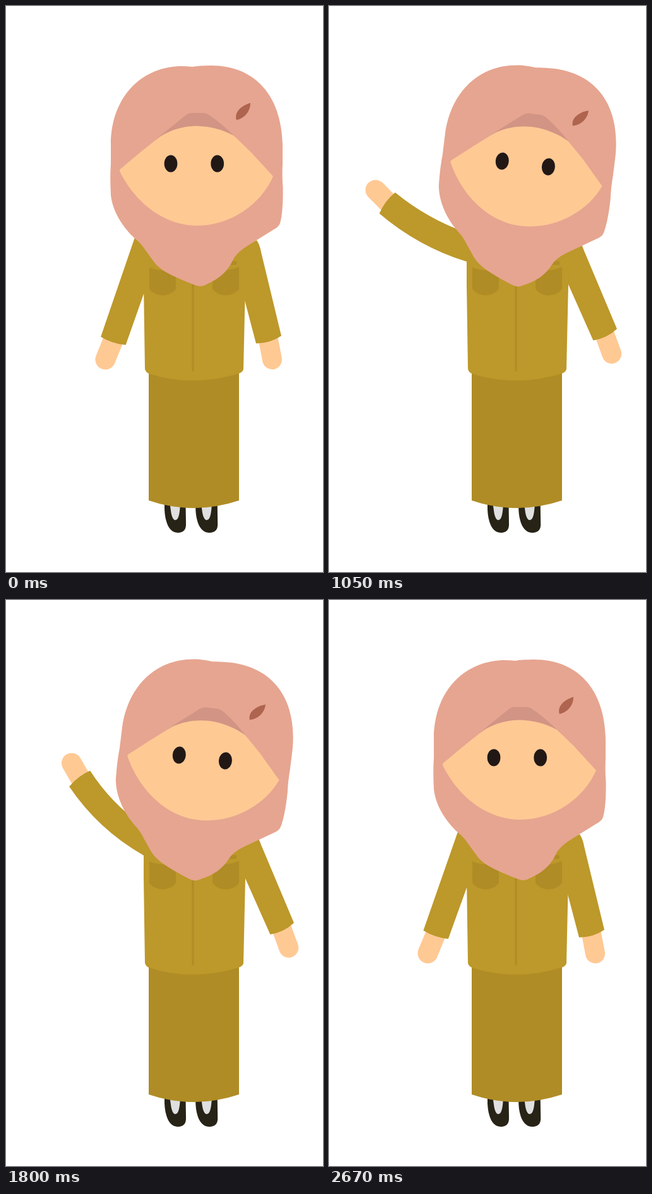
These frames come from a looping animation (502x894 px, 2.7 s). An HTML page:

```html
<!DOCTYPE html>
<html lang="en">
<head>
<meta charset="utf-8">
<title>Waving figure</title>
<style>
html, body { margin: 0; width: 100%; height: 100%; overflow: hidden; background: #fff; }
svg { display: block; width: 100%; height: 100%; }
.shirt { fill: #bd982a; }
.dark { fill: #af8c25; }
.skin { fill: #ffc994; }
.hand { fill: none; stroke: #ffc994; stroke-linecap: round; }
.scarf { fill: #e6a590; }
.eye { fill: #211816; }
</style>
</head>
<body>
<svg viewBox="0 0 502 894">
  <defs>
    <g id="shoe">
      <path fill="#272316" d="M251 786V795C252 817 259 832 272 832C281 832 285 827 285 819L284.500 786Z"/>
      <path fill="#e0e0e0" d="M259.500 786L261 797C262 806 265 812 268 812C273 812 275 804 276 786Z"/>
    </g>
  </defs>
  <use href="#shoe"/>
  <use href="#shoe" transform="translate(41.700) scale(1.030 1)"/>
  <path class="dark" d="M226 570V781Q297 805 369 781V570Z"/>

  <path id="waveHand" class="hand" stroke-width="32"/>
  <path id="waveArm" class="shirt"/>

  <g id="restArm">
    <path class="hand" stroke-width="31" d="M414.500 522L421.500 558.500"/>
    <path class="shirt" d="M372 380L397 370Q402 377 404.500 391L436 521Q418 533 396 533L371.500 440Z"/>
  </g>

  <path class="shirt" d="M218 368H380L379 440L376 573Q376 577 370 580Q297 603 227 581Q220.500 578 220 573L218 440Z"/>
  <path class="dark" d="M227 413Q240 419 269 418V447Q261 457 247 457Q234 456 227 447Z"/>
  <path class="dark" d="M369 412Q356 419 327 418V447Q335 457 349 457Q362 456 369 447Z"/>
  <path class="dark" d="M345 403H364Q367 406 364 409H345Z"/>
  <path class="dark" d="M294.500 430H297.500V577H294.500Z"/>

  <g id="head">
    <path class="scarf" d="M295 96C287 95 281 95 274 95C205 99 166 153 166 219L166 250Q164.500 268 166 299C169 325 185 350 205 368Q214 375 221 386L235 405C246 419 264 427 300 441Q309 445 317 440C340 430 352 417 359 402Q364 391 379 381L395 371L424 353Q432 349 434 343Q439 325 438.500 287Q437 270 438 250V218C436 143 396 94 324 94Q306 94 295 96Z"/>
    <path fill="#d29484" d="M238 210L284 173Q289 169 294 169H311Q318 169 323 173Q346 189 366 210L302 225Z"/>
    <path class="skin" d="M180.500 258L214 230L243 207C263 194 283 190 302 189.500C323 190 343 195 361 205L388 231L423 269C404 313 356 347 302 347C253 347 206 313 180.500 262Q179.500 260 180.500 258Z"/>
    <path fill="#ae644f" d="M387 153C371 158 361 169 365 180C376 178 387 168 387 153Z"/>
    <ellipse class="eye" cx="261" cy="249"/>
    <ellipse class="eye" cx="334.700" cy="249"/>
  </g>
</svg>
<script>
const LOOP = 2700;
const RISE = 748, BACK = 1930, BACK_END = 2695;   // lean in, lean back
const REST = 18, HIGH = 142, LOW = 101.5;         // wave arm angles, degrees from straight down
const SHOULDER = [215, 390];
const $ = id => document.getElementById(id);
const eyes = document.querySelectorAll('.eye');

const mix = (a, b, k) => a + (b - a) * k;
const ease = (t, from, to) => {
  const k = Math.min(1, Math.max(0, (t - from) / (to - from)));
  return (1 - Math.cos(Math.PI * k)) / 2;
};
const rad = deg => deg * Math.PI / 180;
const step = ([x, y], deg, len) => [x - Math.sin(rad(deg)) * len, y + Math.cos(rad(deg)) * len];
const fmt = p => p.map(v => v.toFixed(2)).join(' ');

// control point that bends the edge a-b towards the lower side
function bend([ax, ay], [bx, by], deg) {
  const k = Math.tan(rad(deg)) / 2;
  return [(ax + bx) / 2 + (by - ay) * k, (ay + by) / 2 - (bx - ax) * k];
}

function drawWave(angle) {
  const turn = angle - REST, curve = turn * 0.11, fade = Math.exp(-turn / 25);
  const cuff = step(SHOULDER, angle, 146);
  const side = angle + turn * 0.04 + 90;
  const outer = step(cuff, side, 20.8), inner = step(cuff, side, -20.8);
  const top = [217 - 13.5 * fade, 367 - 0.09 * turn], pit = [218, 403 + 52 * fade];
  const hem = step(cuff, angle + turn * 0.04, 5);
  $('waveArm').setAttribute('d',
    `M${fmt(top)}Q${fmt(bend(top, outer, curve * 0.85))} ${fmt(outer)}` +
    `Q${fmt(hem)} ${fmt(inner)}Q${fmt(bend(pit, inner, curve))} ${fmt(pit)}L240 420L240 365Z`);

  const wrist = Math.min(1, turn / 75);
  const tip = step(cuff, angle + 5 + 10 * wrist, 32 - 4.5 * wrist);
  $('waveHand').setAttribute('d', `M${fmt(step(cuff, angle, -6))}L${fmt(tip)}`);
}

function draw(t) {
  const lean = ease(t, 0, RISE) - ease(t, BACK, BACK_END);
  const dip = ease(t, 775, 1345) - ease(t, 1435, 1900);
  const shut = ease(t, 0, 120) - ease(t, 630, 750) + ease(t, BACK, 2050) - ease(t, 2540, 2660);

  $('head').setAttribute('transform', `rotate(${7 * lean} 300.4 355.5)`);
  $('restArm').setAttribute('transform', `rotate(${-9.25 * lean} 378 392)`);
  drawWave(mix(REST, HIGH, lean) - (HIGH - LOW) * dip);

  const size = mix(1, 0.26, shut);
  for (const eye of eyes) {
    eye.setAttribute('rx', 10.4 * size);
    eye.setAttribute('ry', 13.6 * size);
  }
}

const start = performance.now();
function tick() {
  draw((performance.now() - start) % LOOP);
  requestAnimationFrame(tick);
}
tick();
</script>
</body>
</html>
```
